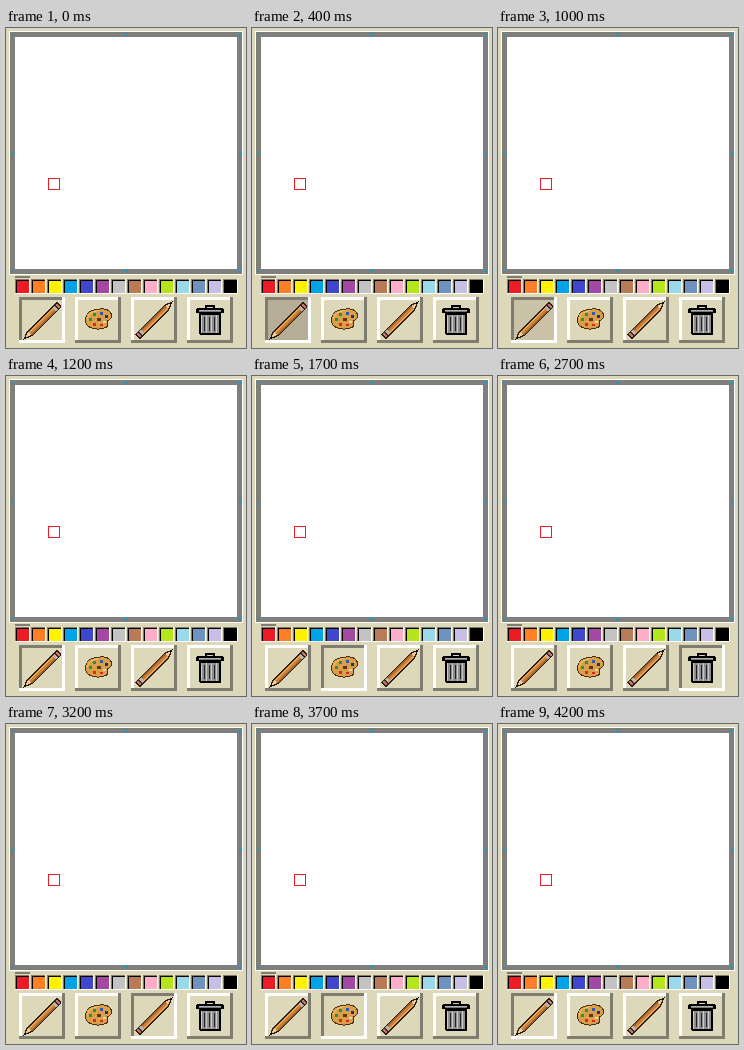
These frames come from a looping animation (240x320 px, 4700 ms). An HTML page:

```html
<!DOCTYPE html>
<html lang="en">
<head>
<meta charset="utf-8">
<title>Paint toolbar</title>
<style>
html, body { margin: 0; width: 100%; height: 100%; overflow: hidden; background: #ddd8ba; }
svg { display: block; width: 100%; height: 100%; shape-rendering: crispEdges; }
.press { opacity: 0; animation: 4700ms step-end infinite; }
.b0 { animation-name: first; }
.b1 { animation-name: second; }
.b2 { animation-name: third; }
.b3 { animation-name: fourth; }
.b0 .face { animation: tint 4700ms step-end infinite; }
@keyframes first { 0%, 89.361%, 100% { opacity: 1 } 36.17% { opacity: 0 } }
@keyframes second { 0%, 46.808%, 89.361%, 100% { opacity: 0 } 36.17%, 78.723% { opacity: 1 } }
@keyframes third { 0%, 57.446%, 78.723%, 100% { opacity: 0 } 46.808%, 68.085% { opacity: 1 } }
@keyframes fourth { 0%, 68.085%, 100% { opacity: 0 } 57.446% { opacity: 1 } }
@keyframes tint {
  0%, 25.531%, 100% { fill: #ddd8ba }
  4.255%, 21.276% { fill: #c9c2a7 }
  8.51% { fill: #b5ad95 }
}
</style>
</head>
<body>
<svg viewBox="0 0 240 320" preserveAspectRatio="none">
  <defs>
    <path id="lit" d="M0 0H46V3H3V46H0Z"/>
    <path id="shade" d="M43 0H46V46H0V43H43Z"/>

    <g id="pencil">
      <path fill="#2e1c0f" d="M4 43L8 34L37 5H38L42 9V10L13 39Z"/>
      <path fill="#efc99a" d="M6 41L9 35L12 38Z"/>
      <path fill="#1c120c" d="M4 43L6 39L8 41Z"/>
      <path fill="#e9a452" d="M9 35L33 11L34 12L10 36Z"/>
      <path fill="#cd8136" d="M10 36L34 12L35.500 13.500L11.500 37.500Z"/>
      <path fill="#97602a" d="M11.500 37.500L35.500 13.500L36.500 14.500L12.500 38.500Z"/>
      <path fill="#b9b6b2" d="M33 11L35 9L38.500 12.500L36.500 14.500Z"/>
      <path fill="#3a2a25" d="M35 9L36 8L39.500 11.500L38.500 12.500Z"/>
      <path fill="#c9756b" d="M36 8L37.500 6.500L41 10L39.500 11.500Z"/>
    </g>
    <use id="eraser" href="#pencil" transform="rotate(180 23 23.5)"/>

    <g id="palette">
      <path fill="#d9a047" stroke="#4a2b12" d="M22.500 12.500C29 10.500 36.500 13 36.500 19C36.500 23 33 22 32.500 24.500C32 27 34.500 28 31.500 30C25 33.500 10.500 33 10.500 23C10.500 17 15 13 22.500 12.500Z"/>
      <path fill="none" stroke="#f0c673" d="M12.500 22C13 17 18 14 24 13.500"/>
      <path fill="#2f8f46" d="M18 16h3v3h-3zM14 21h3v3h-3z"/>
      <path fill="#2d57b8" d="M25 15h3v3h-3z"/>
      <path fill="#26306e" d="M30 18h3v3h-3z"/>
      <path fill="#d8282c" d="M18 26h3v3h-3zM25 27h3v2h-3z"/>
      <path fill="#5b3516" d="M22 21h4v3h-4z"/>
      <path fill="#ddd8ba" d="M28 24h3v2h-3z"/>
    </g>

    <g id="bin">
      <path d="M18 8H28V11H35L37 12V16H34V37L33 38H13L12 37V16H9V12L11 11H18Z"/>
      <path fill="#ddd8ba" d="M20 10h6v1h-6z"/>
      <path fill="#b5b5b5" d="M12 13h22v1h-22z"/>
      <path fill="#777" d="M12 14h22v1h-22z"/>
      <path fill="#8f8f8f" d="M14 18h18v18h-18z"/>
      <path fill="#c9c9c9" d="M14 18h1v18h-1zM19 18h1v18h-1zM24 18h1v18h-1zM29 18h1v18h-1z"/>
      <path fill="#222" d="M17 20h1v14h-1zM22 20h1v14h-1zM27 20h1v14h-1z"/>
    </g>
  </defs>

  <path fill="#ddd8ba" d="M0 0H240V320H0Z"/>
  <path fill="#fff" d="M3 3H237V247H3Z"/>
  <path fill="#7f7c70" d="M4 4H236V246H4Z"/>
  <path fill="#7f7f7f" d="M5 5H235V245H5Z"/>
  <path fill="#fff" d="M9 9H231V241H9Z"/>
  <path fill="#2d95b8" d="M5 6h3v2h-3zM118 6h4v2h-4zM232 6h3v2h-3zM5 124h2v3h-2zM233 124h2v3h-2zM5 242h3v2h-3zM118 242h4v2h-4zM232 242h3v2h-3z"/>
  <rect x="42.500" y="150.500" width="11" height="11" fill="#fff" stroke="#ed1c24"/>
  <path fill="#7f7c70" d="M9 248h15v2h-15z"/>
  <g id="swatches"></g>
  <g id="buttons"></g>
</svg>
<script>
const colors = ["#ed1c24", "#ff7f27", "#fff200", "#00a2e8", "#3f48cc", "#a349a4", "#c3c3c3",
  "#b97a57", "#ffaec9", "#b5e61d", "#99d9ea", "#7092be", "#c8bfe7", "#000"];
const icons = ["pencil", "palette", "eraser", "bin"];

const box = (x, y, size, fill) =>
  `<rect x="${x}" y="${y}" width="${size}" height="${size}" fill="${fill}"/>`;
const bevel = (top, bottom) =>
  `<use href="#lit" fill="${top}"/><use href="#shade" fill="${bottom}"/>`;

document.getElementById("swatches").innerHTML = colors.map((color, i) => {
  const x = 9 + 16 * i;
  return box(x, 251, 15, "#fff") + box(x, 251, 14, "#7f7c70") +
    box(x + 1, 252, 13, "#000") + box(x + 2, 253, 12, color);
}).join("");

document.getElementById("buttons").innerHTML = icons.map((icon, i) =>
  `<g transform="translate(${13 + 56 * i} 269)">
    ${bevel("#fff", "#7f7c70")}
    <g class="press b${i}">
      <path class="face" fill="#ddd8ba" d="M3 3H43V43H3Z"/>
      ${bevel("#7f7c70", "#fff")}
    </g>
    <use href="#${icon}"/>
  </g>`).join("");
</script>
</body>
</html>
```
